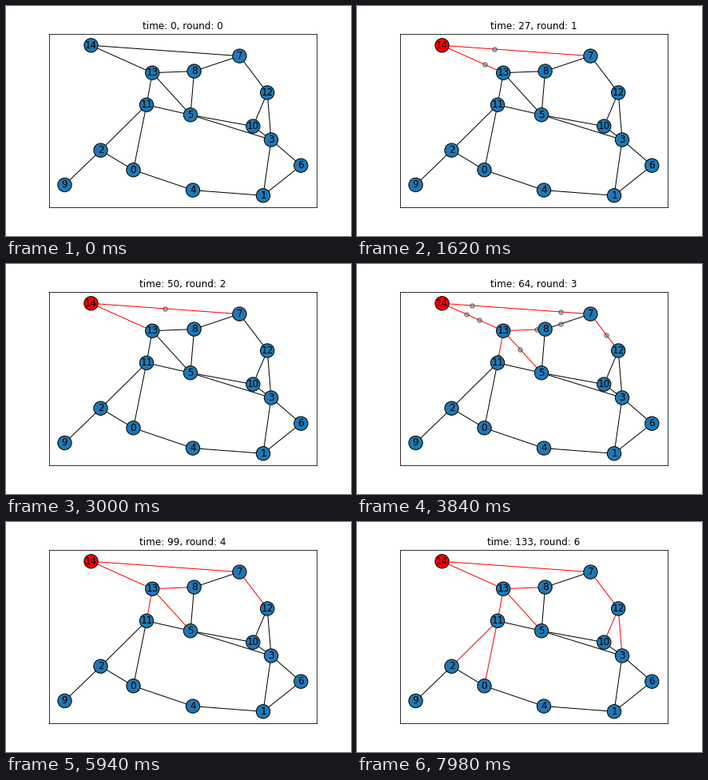
A matplotlib script that plays this animation: 432 by 288 pixels, repeating every 8000 ms.

```python
import matplotlib.pyplot as plt
import numpy as np
from matplotlib.animation import FuncAnimation
from matplotlib.collections import LineCollection

plt.rcParams["text.kerning_factor"] = 6

TICK_MS, FRAME_MS, LOOP_MS = 60, 20, 8000
ROUND = 20  # ticks per round
ROOT = 14
STRETCH, SPEED = 1.31, 8.893  # vertical weight and pixels per tick

POS = np.array([
    (159.5, 205.3), (322, 237.3), (118.5, 180.7), (332, 167.5), (234, 230.6),
    (231, 136.3), (369.3, 199.7), (292.4, 62.6), (235.6, 81.6), (73.5, 224),
    (309.3, 150.6), (176, 123.8), (327.2, 108.5), (183.2, 83.7), (106.5, 49.3),
])
NODES = range(len(POS))

LINKS = [(a, b) for a, ends in {
    14: (13, 7), 13: (8, 11, 5), 7: (8, 12), 5: (8, 11, 10, 3), 11: (2, 0),
    12: (10, 3), 3: (10, 6, 1), 1: (6, 4), 0: (4, 2), 2: (9,),
}.items() for b in ends]


def travel_ticks(a, b):
    dx, dy = POS[b] - POS[a]
    return int(np.hypot(dx, STRETCH * dy) / SPEED)


ARCS = LINKS + [(b, a) for a, b in LINKS]
DELAY = {arc: travel_ticks(*arc) for arc in ARCS}


def grow_tree():
    """Breadth-first layers; each node joins the sender that reaches it first."""
    depth, parent, layer = {ROOT: 0}, {}, [ROOT]
    while layer:
        joined = []
        for a, b in sorted(ARCS, key=DELAY.get):
            if a in layer and b not in depth:
                depth[b], parent[b] = depth[a] + 1, a
                joined.append(b)
        layer = joined
    return depth, parent


DEPTH, PARENT = grow_tree()


def sends(rnd):
    """Even rounds explore outwards, odd rounds report to all neighbours."""
    explore, status = [], []
    level, odd = divmod(rnd, 2)
    for a, b in ARCS:
        if DEPTH[a] > level:
            continue
        if DEPTH[a] == level and not odd:
            if PARENT.get(a) != b:
                explore.append((a, b))
        elif max(DEPTH[a], DEPTH[b]) >= level and (odd or PARENT.get(b) == a):
            status.append((a, b))
    return explore, status


def places(arcs, step):
    pts = [POS[a] + (POS[b] - POS[a]) * step / DELAY[a, b]
           for a, b in arcs if 0 < step < DELAY[a, b]]
    return np.array(pts).reshape(-1, 2)


def edge_color(a, b, reached):
    in_tree = a == PARENT.get(b) and DEPTH[b] <= reached
    return "red" if in_tree else "black"


fig = plt.figure(figsize=(6, 4), dpi=72, facecolor="white")
ax = fig.add_axes([0.125, 0.125, 0.775, 0.755])
ax.set(xlim=(54, 388.8), ylim=(252, 34.56), xticks=[], yticks=[])
title = ax.set_title("", fontsize=12)

edges = LineCollection([POS[[a, b]] for a, b in LINKS], linewidths=1, zorder=1)
ax.add_collection(edges)


def dots(size, face, **style):
    return ax.scatter([], [], s=size, c=face, edgecolors="black",
                      linewidths=1, zorder=2, **style)


explore_dots = dots(100, "#ff9090")
status_dots = dots(30, "gray", alpha=0.5)
nodes = ax.scatter(*POS.T, s=300, edgecolors="black", linewidths=1, zorder=3)
for n, (x, y) in enumerate(POS):
    ax.text(x, y, str(n), fontsize=12, ha="center", va="center", zorder=4)


def draw(frame):
    tick = frame * FRAME_MS // TICK_MS
    rnd, step = divmod(tick, ROUND)
    title.set_text(f"time: {tick}, round: {rnd}")
    edges.set_color([edge_color(a, b, (rnd + 1) // 2) for a, b in LINKS])
    nodes.set_facecolor(["red" if n == ROOT and tick else "#1f78b4" for n in NODES])
    explore, status = sends(rnd)
    explore_dots.set_offsets(places(explore, step))
    status_dots.set_offsets(places(status, step))
    return edges, nodes, explore_dots, status_dots, title


anim = FuncAnimation(fig, draw, frames=LOOP_MS // FRAME_MS, interval=FRAME_MS,
                     repeat=True, repeat_delay=0)
plt.show()
```
